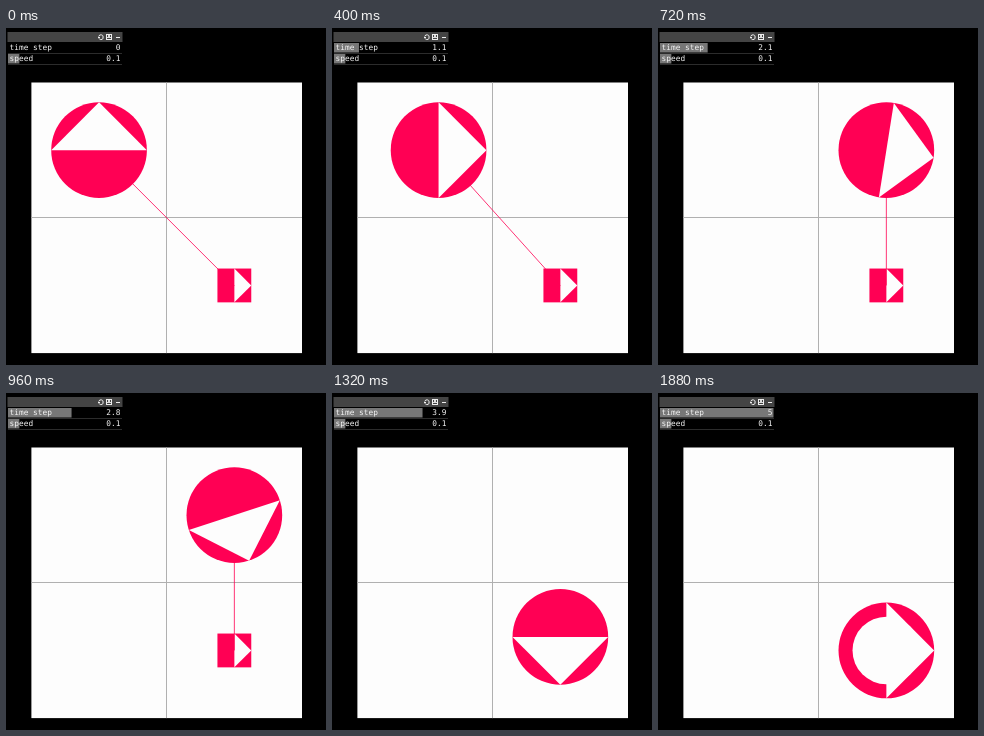
These frames come from a looping animation (320x337 px, 2400 ms). An HTML page with a canvas:

```html
<!DOCTYPE html>
<html lang="en">
<head>
<meta charset="utf-8">
<title>Time step</title>
<style>
html, body { margin: 0; width: 100%; height: 100%; overflow: hidden; background: #000; }
canvas { display: block; width: 320px; height: 337px; }
</style>
</head>
<body>
<canvas id="stage" width="320" height="337"></canvas>
<script>
const ctx = document.getElementById('stage').getContext('2d');
const LOOP = 2400, TICK = 40, MAX = 5;
const PINK = '#ff0054', PAPER = '#fdfdfd';
const LEFT = 25.4, TOP = 54.5, SIZE = 270.6;
const HALF = SIZE / 2, QUARTER = SIZE / 4;
const INNER = SIZE / 8, RADIUS = INNER * Math.SQRT2;
const NEAR = { x: LEFT + QUARTER, y: TOP + QUARTER };
const FAR = { x: NEAR.x + HALF, y: NEAR.y + HALF };

const clamp = v => Math.min(1, Math.max(0, v));

function rect(color, x, y, w, h) {
  ctx.fillStyle = color;
  ctx.fillRect(x, y, w, h);
}

function disc(color, x, y, r) {
  ctx.fillStyle = color;
  ctx.beginPath();
  ctx.arc(x, y, r, 0, Math.PI * 2);
  ctx.fill();
}

function line(color, x1, y1, x2, y2, width = 1) {
  ctx.strokeStyle = color;
  ctx.lineWidth = width;
  ctx.beginPath();
  ctx.moveTo(x1, y1);
  ctx.lineTo(x2, y2);
  ctx.stroke();
}

// Half-square arrow pointing right, its base through the origin
function arrow(r, tip) {
  ctx.fillStyle = PAPER;
  ctx.beginPath();
  ctx.moveTo(0, -r);
  ctx.lineTo(tip, 0);
  ctx.lineTo(0, r);
  ctx.fill();
}

function slider(y, label, value, part) {
  rect('#000', 2, y, 114, 10);
  rect('#777', 2, y, 113.5 * part, 9.5);
  rect('#2c2c2c', 2, y + 10, 114, 1);
  ctx.fillStyle = '#f4f4f4';
  ctx.textAlign = 'left';
  ctx.fillText(label, 3.6, y + 7);
  ctx.textAlign = 'right';
  ctx.fillText(value, 114.4, y + 7);
}

function panel(t) {
  rect('#444', 1.5, 4, 115, 10);
  ctx.strokeStyle = '#eee';
  ctx.lineWidth = 1;
  for (const a of [0.3, 0.3 + Math.PI]) {
    ctx.beginPath();
    ctx.arc(95, 9.2, 2.4, a, a + 2.3);
    ctx.stroke();
  }
  rect('#eee', 92, 9, 2, 1);
  rect('#eee', 96, 8.5, 2, 1);
  ctx.strokeStyle = '#eee';
  ctx.strokeRect(100.5, 6.5, 5, 5);
  rect('#ddd', 102, 7, 2, 2);
  rect('#ddd', 101, 9, 4, 1);
  rect('#eee', 110, 9, 4, 1);

  ctx.font = '7.8px "DejaVu Sans Mono", "Liberation Mono", monospace';
  slider(15, 'time step', String(t), t / MAX);
  slider(26, 'speed', '0.1', 0.1);
}

function board() {
  rect(PAPER, LEFT, TOP, SIZE, SIZE);
  line('#b0b0b0', 160.5, TOP, 160.5, TOP + SIZE);
  line('#b0b0b0', LEFT, 189.5, LEFT + SIZE, 189.5);
}

function block() {
  const h = INNER / 2;
  rect(PINK, FAR.x - h, FAR.y - h, h * 2, h * 2);
  ctx.save();
  ctx.translate(FAR.x, FAR.y);
  arrow(h, h);
  ctx.restore();
}

function wheel(t) {
  const x = NEAR.x + HALF * clamp(t - 1);
  const y = NEAR.y + HALF * clamp(t - 3);
  const turns = clamp(t) + clamp(t - 2) - clamp(t - 4) - 1;
  line(PINK, x, y, FAR.x, FAR.y, 0.8);
  disc(PINK, x, y, RADIUS);
  ctx.save();
  ctx.translate(x, y);
  ctx.rotate(turns * Math.PI / 2);
  arrow(RADIUS, RADIUS);
  ctx.restore();
  if (t >= MAX) disc(PAPER, x, y, INNER);
}

// The counter gains 0.1 thirty times a second, shown at 25 pictures a second
function stepAt(ms) {
  const shown = Math.floor(ms / TICK) * TICK;
  const n = Math.floor(shown * 0.03 - 0.5);
  return Math.min(MAX * 10, Math.max(0, n)) / 10;
}

function draw(ms) {
  const t = stepAt(ms % LOOP);
  rect('#000', 0, 0, 320, 337);
  board();
  block();
  wheel(t);
  panel(t);
}

let start = null;
function frame(now) {
  if (start === null) start = now;
  draw(now - start);
  requestAnimationFrame(frame);
}
draw(0);
requestAnimationFrame(frame);
</script>
</body>
</html>
```
